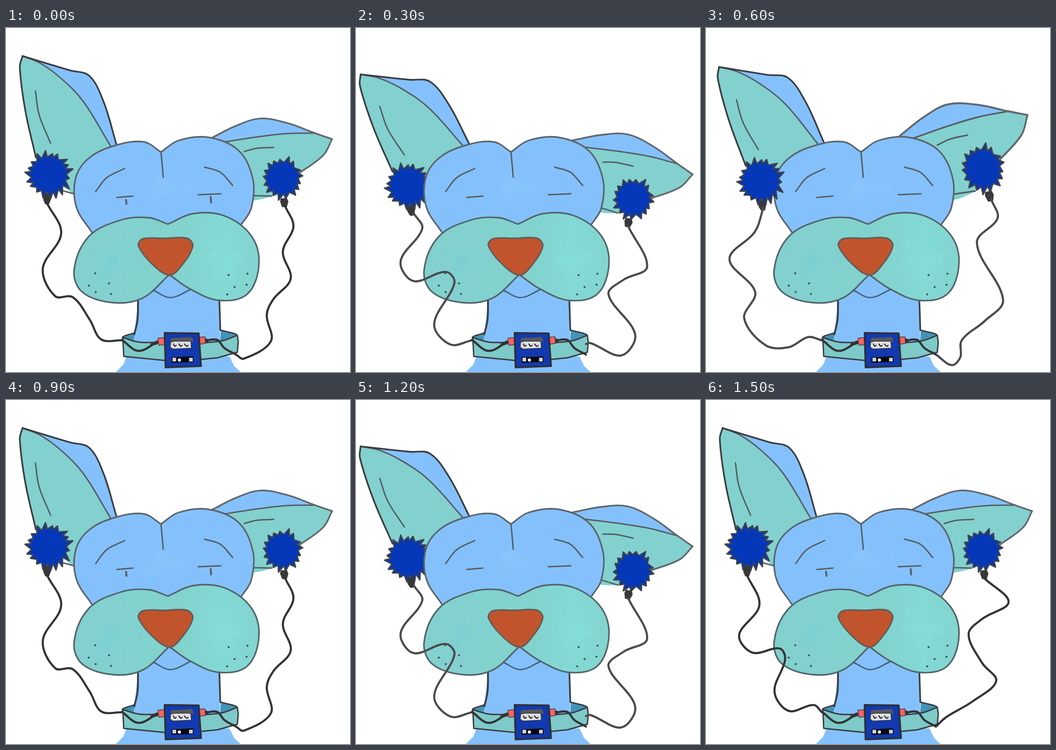
Recreate the animation shown at these times as an HTML page with a canvas. Size 748x749 px, loop 1.8 s.

```html
<!DOCTYPE html>
<html lang="en">
<head>
<meta charset="utf-8">
<title>Dog with headphones</title>
<style>
html, body { margin: 0; width: 100%; height: 100%; overflow: hidden; background: #fff; }
canvas { display: block; }
</style>
</head>
<body>
<canvas id="stage" width="748" height="749"></canvas>
<script>
const ctx = document.getElementById('stage').getContext('2d');
const BLUE = '#84c1fc', TEAL = '#82d1cf', NAVY = '#0538b8', INK = '#3b3d40', GREY = '#565c62';
const STEP = 300;

// Smooth curve through key points; several runs meet at corners.
function curve(...runs) {
  const path = new Path2D();
  runs.forEach((run, k) => {
    const pts = [];
    for (let i = 0; i < run.length; i += 2) pts.push([run[i], run[i + 1]]);
    const gap = i => Math.hypot(pts[i + 1][0] - pts[i][0], pts[i + 1][1] - pts[i][1]);
    const slope = i => {
      const a = Math.max(0, i - 1), b = Math.min(pts.length - 1, i + 1);
      let len = 0;
      for (let j = a; j < b; j++) len += gap(j);
      return [(pts[b][0] - pts[a][0]) / len, (pts[b][1] - pts[a][1]) / len];
    };
    path[k ? 'lineTo' : 'moveTo'](...pts[0]);
    for (let i = 0; i + 1 < pts.length; i++) {
      const [p, q, s, t, h] = [pts[i], pts[i + 1], slope(i), slope(i + 1), gap(i) * 0.36];
      path.bezierCurveTo(p[0] + s[0] * h, p[1] + s[1] * h, q[0] - t[0] * h, q[1] - t[1] * h, ...q);
    }
  });
  return path;
}

function poly(...p) {
  const path = new Path2D();
  for (let i = 0; i < p.length; i += 2) path.lineTo(p[i], p[i + 1]);
  path.closePath();
  return path;
}

function fill(path, color) {
  ctx.fillStyle = color;
  ctx.fill(path);
}

function line(path, width = 3, color = GREY) {
  ctx.lineWidth = width;
  ctx.strokeStyle = color;
  ctx.stroke(path);
}

function shape(path, color, width, ink) {
  fill(path, color);
  line(path, width, ink);
}

function dot(x, y, r = 2.3, color = '#3c5860') {
  ctx.fillStyle = color;
  ctx.beginPath();
  ctx.arc(x, y, r, 0, 7);
  ctx.fill();
}

function random(seed) {
  return () => (seed = seed * 16807 % 2147483647) / 2147483647;
}

function spiky(x, y, inner, outer, count, seed) {
  const rnd = random(seed), pts = [];
  const add = (r, a) => pts.push(x + r * Math.cos(a), y + r * Math.sin(a));
  for (let i = 0; i < count; i++) {
    const a = i / count * Math.PI * 2;
    add(inner, a);
    add(outer + (rnd() - 0.5) * 9, a + Math.PI / count + (rnd() - 0.3) * 0.22);
  }
  return poly(...pts);
}

// Faint paint patches around a centre.
function mottle(x, y, spread, color, seed) {
  const rnd = random(seed);
  ctx.globalAlpha = 0.14;
  for (let i = 0; i < 18; i++) {
    const a = rnd() * 7, d = rnd() * spread, r = 10 + rnd() * 14;
    fill(spiky(x + d * Math.cos(a), y + d * Math.sin(a), r * 0.7, r, 9, seed + i), color);
  }
  ctx.globalAlpha = 1;
}

function makeEar({ top, inner, side, under, leftSide, base, crease, pom, stem, edge }) {
  const rest = leftSide ? [under, side] : [side, under];
  return {
    outline: curve(top, ...rest), front: curve(inner, ...rest), pom, stem, edge,
    edges: [curve(top), curve(side)], folds: [inner, base, crease].map(p => curve(p))
  };
}

const leftEar = makeEar({
  leftSide: true, edge: INK,
  top: [36, 61, 75, 73, 138, 92, 181, 104, 212, 160, 240, 253],
  inner: [36, 61, 75, 77, 119, 109, 168, 160, 228, 258],
  under: [228, 258, 190, 350, 148, 361, 65, 282],
  side: [65, 282, 42, 180, 30, 85, 36, 61],
  base: [122, 354, 148, 361],
  crease: [64, 137, 72, 189, 97, 251],
  pom: spiky(93, 319, 38, 50, 19, 41),
  stem: poly(83, 362, 95, 361, 96, 375, 93, 383, 86, 383, 82, 374)
});

const rightEar = makeEar({
  edge: '#62686d',
  top: [444, 241, 500, 213, 553, 197, 612, 207, 672, 229, 709, 242],
  inner: [464, 250, 540, 238, 610, 230, 672, 229],
  side: [709, 242, 690, 277, 635, 318],
  under: [635, 318, 578, 366, 500, 366, 464, 250],
  base: [500, 364, 578, 366],
  crease: [518, 269, 545, 262, 582, 260],
  pom: spiky(601, 327, 34, 45, 17, 97),
  stem: poly(598, 372, 610, 371, 613, 378, 610, 389, 601, 389, 597, 378)
});

const head = curve(
  [188, 447, 153, 390, 152, 325, 182, 282, 240, 255, 300, 248, 337, 270],
  [337, 270, 375, 245, 440, 238, 506, 267, 537, 330, 533, 393, 511, 429]);
const muzzle = curve(
  [355, 537, 297, 588, 232, 598, 166, 575, 148, 528, 180, 454, 250, 418, 310, 413, 352, 427],
  [352, 427, 408, 404, 475, 409, 533, 452, 550, 514, 525, 579, 463, 593, 400, 568, 355, 537]);
const nose = curve([345, 458, 394, 458, 406, 475, 382, 517, 356, 538, 320, 516, 288, 474, 298, 459, 345, 458]);
const whiskers = [[194, 534], [224, 556], [180, 561], [195, 575], [228, 579],
  [484, 538], [525, 535], [523, 559], [497, 564], [481, 580]];

// Ears swing about a pivot: where it sits, the turn, and the stretch.
const LEFT = [240, 253], RIGHT = [518, 269];
const rest = { left: [...LEFT, 0, 1, 1], right: [...RIGHT, 0, 1, 1], awake: true, ink: '#333436' };
const up = { ...rest,
  cableL: [89, 381, 120, 447, 80, 524, 107, 584, 145, 586, 182, 635, 207, 678],
  cableR: [607, 388, 625, 432, 602, 487, 619, 546, 581, 591, 567, 625, 576, 682, 517, 720] };
const swing = { ...rest,
  cableL: [89, 381, 116, 447, 72, 512, 101, 550, 160, 541, 172, 565, 149, 635, 180, 677, 234, 664],
  cableR: [605, 388, 658, 440, 600, 477, 571, 510, 600, 572, 631, 612, 580, 656, 523, 690] };
const low = {
  left: [246, 252, -0.186, 1, 1], right: [537, 292, 0.275, 1.02, 1.01], ink: '#4a4b4e', pomBehind: true,
  cableL: [126, 404, 144, 437, 97, 508, 125, 551, 195, 531, 214, 555, 170, 645, 205, 689],
  cableR: [592, 432, 633, 520, 582, 548, 549, 580, 607, 667, 577, 713, 510, 686] };
const tilted = {
  left: [256, 248, -0.133, 1, 1], right: [503, 255, -0.17, 1.07, 1.16], ink: '#4a4b4e',
  cableL: [125, 391, 106, 444, 51, 503, 107, 575, 83, 632, 130, 691, 180, 695, 222, 673],
  cableR: [620, 373, 634, 414, 589, 468, 646, 592, 606, 638, 556, 680, 553, 717, 534, 734] };
const loop = [up, low, tilted, up, low, swing];

function posed(pivot, [x, y, turn, sx, sy], draw, ear) {
  ctx.save();
  ctx.translate(x, y);
  ctx.rotate(turn);
  ctx.scale(sx, sy);
  ctx.translate(-pivot[0], -pivot[1]);
  draw(ear);
  ctx.restore();
}

function drawEar(ear) {
  fill(ear.outline, BLUE);
  fill(ear.front, TEAL);
  ear.folds.forEach(f => line(f));
  ear.edges.forEach(e => line(e, 3.6, ear.edge));
}

function drawPom(ear) {
  shape(ear.pom, NAVY, 3, '#3f4349');
  shape(ear.stem, '#38383a', 2, INK);
}

function drawBody() {
  fill(poly(262, 715, 255, 733, 239, 749, 510, 749, 496, 736, 486, 715), BLUE);
  shape(curve([280, 684, 253, 674, 282, 663]), '#4293b8', 3, INK);
  shape(curve([467, 658, 502, 669, 466, 684]), '#4293b8', 3, INK);
  fill(poly(340, 540, 372, 540, 464, 594, 466, 685, 277, 685, 287, 594), BLUE);
  line(curve([287, 594, 286, 635, 279, 667]), 4, INK);
  line(curve([464, 594, 466, 658]), 3.6, INK);
  shape(curve([254, 674, 290, 684, 345, 684], [420, 686, 470, 681, 503, 669],
    [505, 684, 503, 706], [460, 718, 420, 722], [347, 724, 256, 715], [254, 674]), '#7dcac9', 3, INK);
}

function drawHead(awake) {
  shape(head, BLUE, 3.4, '#5c636a');
  mottle(330, 345, 70, '#8bc6ff', 19);
  line(curve([337, 270, 342, 325]));

  const shade = ctx.createLinearGradient(200, 0, 540, 0);
  shade.addColorStop(0, TEAL);
  shade.addColorStop(0.5, '#82d2cd');
  shade.addColorStop(0.8, '#83d9d4');
  shade.addColorStop(1, '#83d5d0');
  shape(muzzle, shade, 3.4, '#53646a');
  mottle(235, 505, 55, '#79cbd0', 53);
  mottle(465, 495, 50, '#87e2da', 71);
  line(curve([320, 571, 358, 587, 402, 569]), 3, '#47637c');
  shape(nose, '#c2542d', 3.4, '#655c58');

  line(curve([195, 356, 219, 326, 258, 306]));
  line(curve([432, 303, 466, 314, 493, 343]));
  line(curve([241, 369, 276, 366]));
  line(curve([418, 363, 467, 361]));
  if (awake) {
    line(curve([261, 374, 262, 383]), 4);
    line(curve([445, 368, 446, 380]), 4);
  }
  whiskers.forEach(w => dot(...w));
}

function drawPlayer() {
  const left = poly(331, 676, 343, 675, 344, 689, 333, 690);
  const right = poly(421, 674, 432, 673, 433, 686, 421, 688);
  for (const plug of [left, right]) {
    line(plug, 3, INK);
    fill(plug, '#fb6261');
  }
  fill(poly(313, 688, 328, 680, 331, 688, 317, 692), '#333');
  fill(poly(433, 675, 440, 678, 440, 684, 433, 687), '#333');
  shape(poly(345, 664, 419, 665, 424, 736, 347, 739), '#1239b0', 4, '#2d3038');
  fill(poly(359, 675, 405, 673, 408, 683, 358, 683), '#57575b');
  shape(poly(358, 684, 366, 682, 402, 682, 403, 697, 363, 699, 357, 695), '#dfe0e2', 1.6, '#34363c');
  for (let i = 0; i < 3; i++) {
    const x = 364 + i * 12;
    line(curve([x, 688, x + 3 + i, 693, x + 6 + i, 691]), 2.4, '#242424');
  }
  fill(poly(360, 717, 407, 715, 408, 727, 360, 729), '#08090d');
  for (const x of [362, 398]) fill(poly(x, 718, x + 8, 718, x + 8, 726, x, 726), '#d0d1d4');
  dot(377, 723, 3.4, '#fff');
}

function draw(pose) {
  const leftPom = () => posed(LEFT, pose.left, drawPom, leftEar);
  ctx.fillStyle = '#fff';
  ctx.fillRect(0, 0, 748, 749);
  posed(LEFT, pose.left, drawEar, leftEar);
  posed(RIGHT, pose.right, drawEar, rightEar);
  if (pose.pomBehind) leftPom();
  drawBody();
  drawHead(pose.awake);
  if (!pose.pomBehind) leftPom();
  posed(RIGHT, pose.right, drawPom, rightEar);
  line(curve([...pose.cableL, 252, 680]), 4.6, pose.ink);
  line(curve([...pose.cableR, 500, pose.pomBehind ? 688 : 711]), 4.6, pose.ink);
  line(curve([252, 679, 288, 703, 330, 683]), 4.6, '#333436');
  line(curve([432, 681, 459, 679, 475, 697, 500, 711]), 4.6, '#333436');
  drawPlayer();
}

ctx.lineCap = ctx.lineJoin = 'round';
let shown = -1;
const start = performance.now();
function tick(now) {
  const index = Math.floor(Math.max(0, now - start) / STEP) % loop.length;
  if (index !== shown) draw(loop[shown = index]);
  requestAnimationFrame(tick);
}
tick(start);
</script>
</body>
</html>
```
